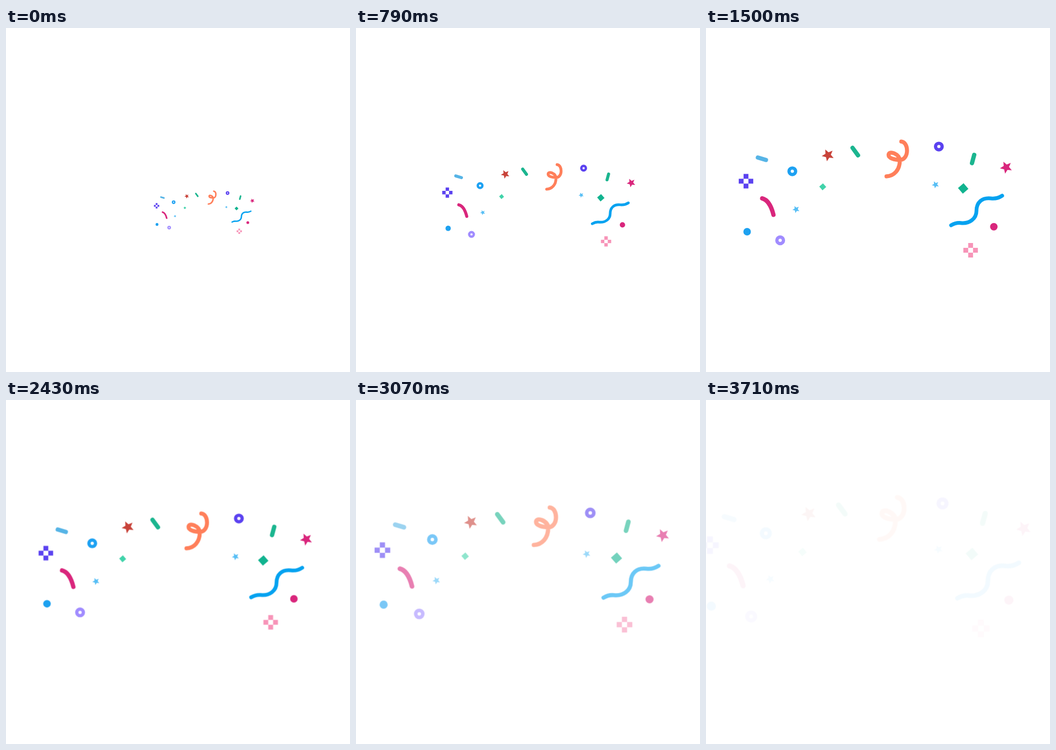
Animation of 640x640 px, one loop 5.93 s. Source, as an HTML page:

```html
<!DOCTYPE html>
<html lang="en">
<head>
<meta charset="utf-8">
<title>Confetti burst</title>
<style>
  html, body { margin: 0; width: 100%; height: 100%; overflow: hidden; background: #fff; }
  svg { display: block; width: 100vw; height: 100vh; }
</style>
</head>
<body>
<svg viewBox="0 0 640 640"><g id="confetti"></g></svg>
<script>
const LOOP = 5930, STEPS_PER_MS = 0.014;
const CX = 400, CY = 357.5;

const line = (d, color, width = 8) =>
  `<path d="${d}" fill="none" stroke="${color}" stroke-width="${width}" stroke-linecap="round" stroke-linejoin="round"/>`;
const dot = (x, y, color) => `<circle cx="${x}" cy="${y}" r="7" fill="${color}"/>`;
const ring = (x, y, color) =>
  `<circle cx="${x}" cy="${y}" r="6.1" fill="none" stroke="${color}" stroke-width="6.2"/>`;
const checker = (x, y, color) =>
  `<path transform="translate(${x} ${y})" fill="${color}" d="M-4.5-13.5h9v9h-9zM-13.5-4.5h9v9h-9zM4.5-4.5h9v9h-9zM-4.5 4.5h9v9h-9z"/>`;
const polygon = (x, y, color, count, radius, start) => {
  const points = Array.from({ length: count }, (_, i) => {
    const a = (start + i * 360 / count) * Math.PI / 180, r = radius(i);
    return (x + r * Math.cos(a)).toFixed(2) + ',' + (y + r * Math.sin(a)).toFixed(2);
  });
  return `<polygon points="${points.join(' ')}" fill="${color}"/>`;
};
const star = (x, y, r, color) => polygon(x, y, color, 10, i => i % 2 ? r * 0.45 : r, 100);
const diamond = (x, y, r, color) => polygon(x, y, color, 4, () => r, 4);

const confetti = document.getElementById('confetti');
confetti.innerHTML = [
  line('M96.5 241L111.5 245.5', '#56b4e6'),
  checker(74.4, 285, '#5b42f0'),
  ring(160.6, 266.6, '#1da1f2'),
  star(227, 236.5, 11.8, '#c8433a'),
  line('M272.7 223L282.8 236.8', '#1bb58f'),
  diamond(217.2, 295.4, 6.5, '#41d3aa'),
  line('M104.5 317C113 319 121 329 125.5 347.5', '#d9267c'),
  star(167.6, 337.4, 6.9, '#56bef5'),
  dot(76.5, 379, '#1da1f0'),
  ring(138, 395, '#a18cff'),
  line('M363.3 211.3C370.5 212 374 220 374 228C374 238.5 368 245.3 361 245.3C350 245.3 339.7 242 339.7 236.5' +
       'C339.7 231.5 345 231 350 233.2C357 236.3 360.5 241 360.5 247C360.5 264 350 275.5 335.8 276', '#ff7f5a', 7.4),
  ring(433.2, 220.6, '#5b42f0'),
  line('M499 236L494.9 251.3', '#1bb58f'),
  star(558.5, 259.3, 11.8, '#d9267c'),
  star(427, 291.5, 6.9, '#56bef5'),
  diamond(478.5, 298.5, 9.7, '#11b38f'),
  line('M456 367C462 363.5 468 362 474 362.7C490 364.5 503.2 355 503.2 340C503.2 325 513 315 530 317C538 318 545 316 551 312', '#05a2f0', 7),
  dot(535.5, 369.8, '#d9267c'),
  checker(492.3, 413.5, '#f794b8')
].join('');

const clamp = u => Math.min(1, Math.max(0, u));
const ease = u => u * u * (3 - 2 * u);

function draw(now) {
  // Motion advances in 14 steps per second.
  const step = Math.floor(now % LOOP * STEPS_PER_MS + 0.08);
  const burst = ease(clamp(step / 21));
  const drift = Math.max(0, (step - 33.6) / 18.4) ** 1.45;
  const scale = 0.368 + 0.632 * burst + 0.206 * drift;
  confetti.setAttribute('transform', `translate(${CX} ${CY}) scale(${scale}) translate(${-CX} ${-CY})`);
  confetti.setAttribute('opacity', 1 - ease(clamp((step - 33.6) / 21.4)));
}

const start = performance.now();
function tick() {
  draw(performance.now() - start);
  requestAnimationFrame(tick);
}
tick();
</script>
</body>
</html>
```
